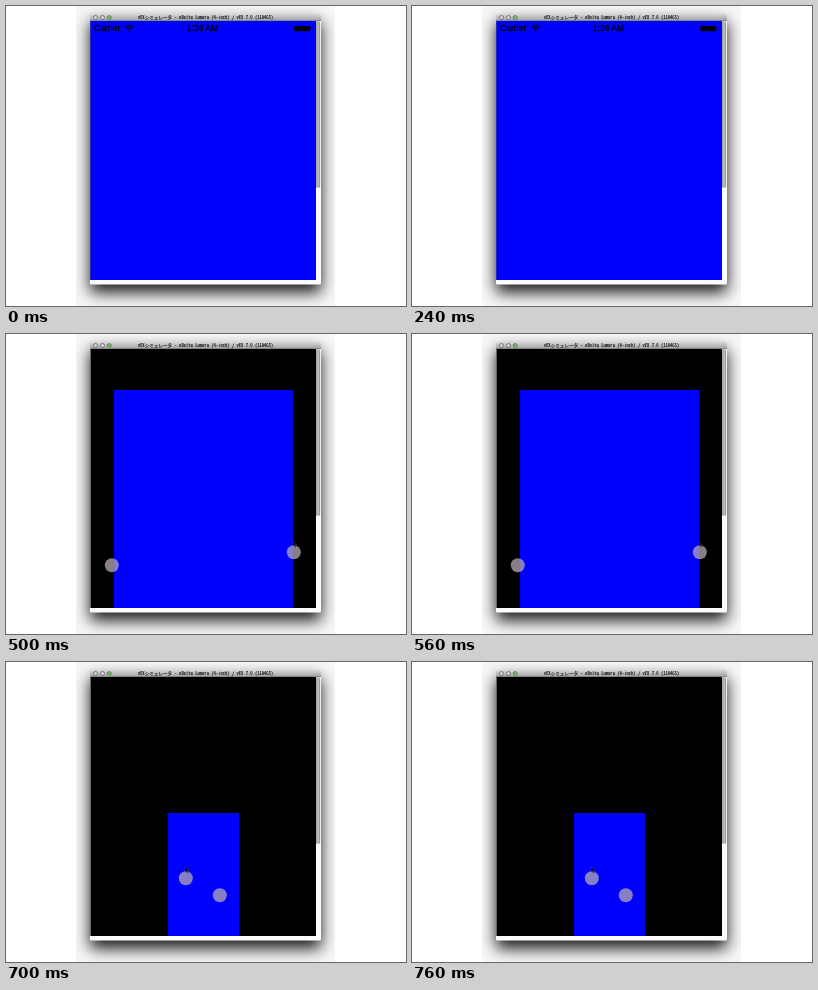
An HTML page that plays this animation: 400 px wide and 300 px high, repeating every 800 ms.

```html
<!DOCTYPE html>
<html lang="ja">
<head>
<meta charset="utf-8">
<title>Pinch to scale</title>
<style>
  html, body { margin: 0; width: 100%; height: 100%; overflow: hidden; background: #fff; }
  svg { display: block; width: 400px; height: 300px; }
  .window { filter: drop-shadow(0 8px 8px rgba(0, 0, 0, .9)); }
  .title { font: 4.6px "Noto Sans Mono CJK JP", "Noto Sans CJK JP", monospace; fill: #111; stroke: #111; stroke-width: .12; }
  .status { font: 8.6px "Liberation Sans", Arial, sans-serif; }
  .status text { stroke: #000; stroke-width: .3; }
  .touch { fill: rgba(180, 170, 176, .75); }
  .raised .touch { filter: drop-shadow(1.2px 1.4px .5px #000); }
</style>
</head>
<body>
<svg viewBox="0 0 400 300">
  <defs>
    <linearGradient id="bar" x2="0" y2="1">
      <stop stop-color="#d8d8d8"/><stop offset=".85" stop-color="#a8a8a8"/><stop offset="1" stop-color="#666"/>
    </linearGradient>
    <linearGradient id="thumb">
      <stop stop-color="#858585"/><stop offset=".5" stop-color="#c8c8c8"/><stop offset="1" stop-color="#858585"/>
    </linearGradient>
    <clipPath id="capture"><path d="M70 0H329V300H70z"/></clipPath>
    <clipPath id="screen"><path d="M84.4 15H310V274H84.4z"/></clipPath>
  </defs>

  <g clip-path="url(#capture)">
    <path d="M70 0H329V300H70z" fill="#f7f7f7"/>
    <rect class="window" x="84" y="8" width="231" height="270.4" rx="1.5" fill="#fcfcfc"/>
  </g>
  <path d="M84 15V9.5Q84 8 85.5 8H313.5Q315 8 315 9.5V15z" fill="url(#bar)"/>
  <g stroke="#666" stroke-width=".8" fill="#d4d4d4">
    <circle cx="89.5" cy="11.5" r="2"/>
    <circle cx="96.5" cy="11.5" r="2"/>
    <circle cx="103.3" cy="11.5" r="2" fill="#7fb868" stroke="#4f7f42"/>
  </g>
  <text class="title" x="199.5" y="12.8" text-anchor="middle">vEXシミュレータ - oBelta Lumora (4-inch) / vEX 7.0 (11A465)</text>
  <rect x="310.2" y="15" width="3.9" height="167" rx="1.8" fill="url(#thumb)"/>

  <g clip-path="url(#screen)">
    <path d="M84 15H310V274H84z"/>
    <rect id="view" fill="#0000fe"/>
    <g class="status">
      <text x="88" y="25.3">Carrier</text>
      <text x="196.5" y="25.3" text-anchor="middle">1:36 AM</text>
      <path d="M119.5 21.5Q123.5 17.8 127.5 21.5M121.2 23.2Q123.5 21 125.8 23.2" fill="none" stroke="#000" stroke-width="1.1"/>
      <circle cx="123.5" cy="24.7" r="1"/>
      <rect x="288.3" y="20" width="15.5" height="5.2" rx=".8"/>
      <rect x="304" y="21.5" width="1" height="2"/>
    </g>
    <g id="fingers">
      <circle class="touch" r="7"/>
      <circle class="touch" r="7"/>
      <path id="cursor" d="M0 0V5.5L1.3 4.4L2.2 6.6L3.1 6.2L2.2 4.1H3.8z" stroke="#777" stroke-width=".3"/>
    </g>
  </g>
</svg>
<script>
const $ = id => document.getElementById(id);
const set = (el, attrs) => Object.entries(attrs).forEach(([k, v]) => el.setAttribute(k, v));

const LOOP = 800;
const VIEW = { cx: 197, cy: 213.9, w: 226, h: 399.5 };
const PIVOT = { x: 196.8, y: 224.7 };
// Pinch steps: start time, view scale, finger offset from the pivot
const steps = [
  { at: 0, scale: 1 },
  { at: 400, scale: 1, dx: 83.5, dy: -0.4 },
  { at: 500, scale: .79, dx: 91, dy: -6.5 },
  { at: 600, scale: .718, dx: 61.5, dy: -12 },
  { at: 700, scale: .314, dx: -17, dy: -8.5 }
];
const touches = document.querySelectorAll('.touch');

function draw(time) {
  const t = time % LOOP;
  const { scale, dx, dy } = steps.findLast(s => s.at <= t);
  const width = Math.round(VIEW.w * scale), height = VIEW.h * scale;
  set($('view'), {
    x: Math.round(VIEW.cx - width / 2), y: Math.round(VIEW.cy - height / 2), width, height
  });

  const touching = dx !== undefined;
  // Fingers cast a shadow until they press and the view shrinks
  set($('fingers'), {
    visibility: touching ? 'visible' : 'hidden',
    class: scale === 1 ? 'raised' : ''
  });
  if (touching) {
    // The second finger mirrors the first through the pivot
    [1, -1].forEach((side, i) =>
      set(touches[i], { cx: PIVOT.x + side * dx, cy: PIVOT.y + side * dy }));
    set($('cursor'), { transform: `translate(${PIVOT.x + dx - .8} ${PIVOT.y + dy - 11.6})` });
  }
}

const start = performance.now();
function tick() {
  draw(performance.now() - start);
  requestAnimationFrame(tick);
}
tick();
</script>
</body>
</html>
```
